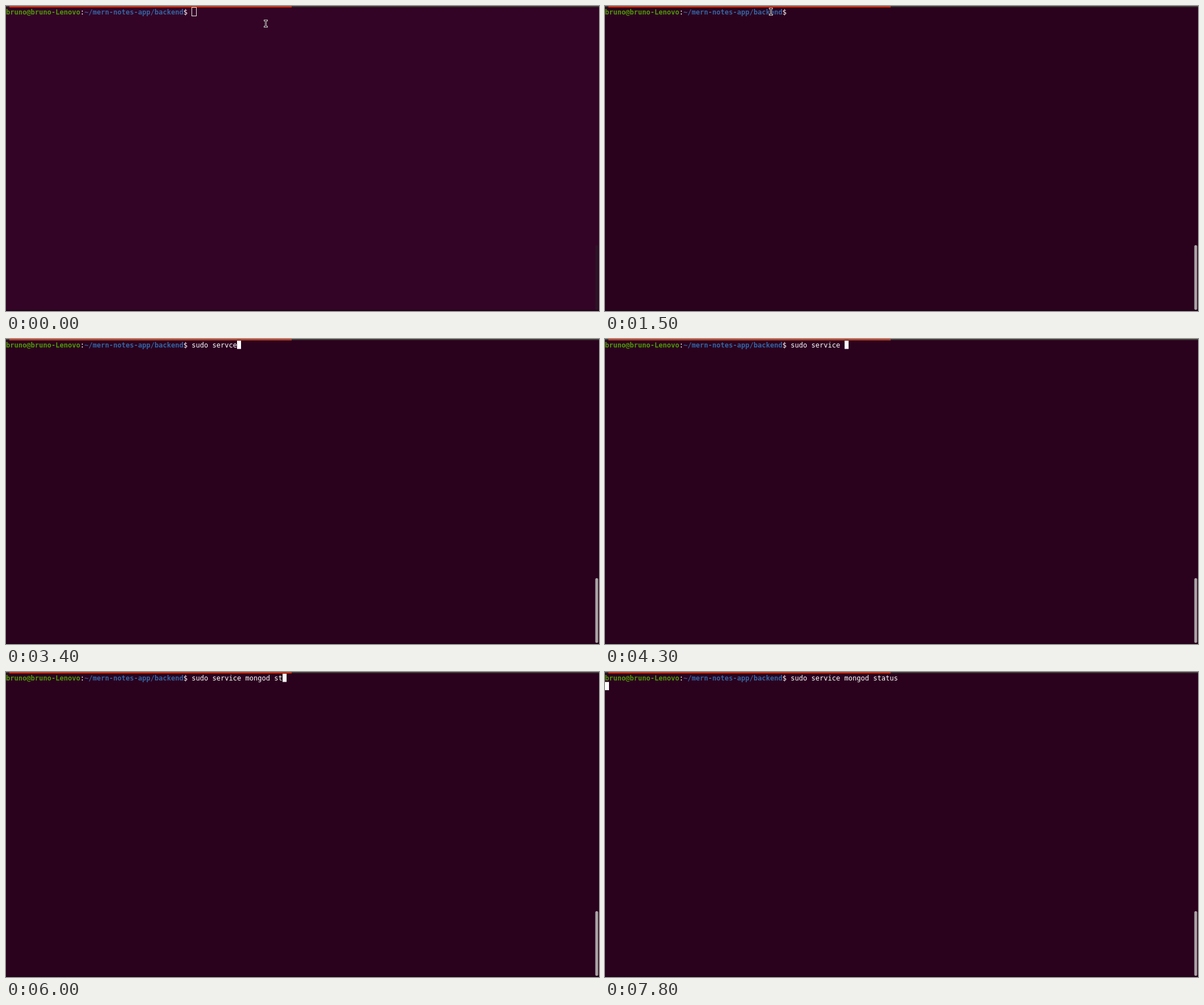
Recreate the animation shown at these times as an HTML page with a canvas. Size 1042x537 px, loop 8000 ms.

```html
<!DOCTYPE html>
<html lang="en">
<head>
<meta charset="utf-8">
<title>Terminal</title>
<style>
  html, body { margin: 0; width: 100%; height: 100%; overflow: hidden; background: #2b021e; }
  canvas { display: block; }
</style>
</head>
<body>
<canvas id="stage" width="1042" height="537"></canvas>
<script>
const ctx = document.getElementById('stage').getContext('2d');
const LOOP = 8000, CELL = 7.25, ROW = 14.5, TOP = 3, BASELINE = 15;
const FONT = '12.04px "DejaVu Sans Mono", monospace';

const PROMPT = [
  ['bruno@bruno-Lenovo', '#4e9a06', true],
  [':', '#ffffff'],
  ['~/mern-notes-app/backend', '#3465a4', true],
  ['$ ', '#ffffff']
];
const PROMPT_COLS = PROMPT.reduce((n, [text]) => n + text.length, 0);

// Each list holds [start time, value] and changes in hard steps.
const TYPED = [
  [0, ''], [2200, 's'], [2300, 'su'], [2400, 'sud'], [2500, 'sudo'], [2600, 'sudo '],
  [2800, 'sudo s'], [2900, 'sudo ser'], [3100, 'sudo serv'],
  [3300, 'sudo servc'], [3400, 'sudo servce'], [3700, 'sudo servc'], [3800, 'sudo serv'],
  [4200, 'sudo servic'], [4300, 'sudo service '],
  [4700, 'sudo service m'], [4800, 'sudo service mo'], [4900, 'sudo service mon'],
  [5000, 'sudo service mongo'], [5700, 'sudo service mongod'], [5800, 'sudo service mongod s'],
  [6000, 'sudo service mongod st'], [6100, 'sudo service mongod sta'],
  [6400, 'sudo service mongod st'], [6700, 'sudo service mongod s'],
  [7100, 'sudo service mongod st'], [7300, 'sudo service mongod sta'],
  [7400, 'sudo service mongod stat'], [7600, 'sudo service mongod status']
];
const POINTER = [
  [0, [456, 31]], [100, [466, 28]], [200, [475, 26]], [800, [377, 38]],
  [900, [334, 25]], [1000, [298, 13]], [1100, [277, 7]], [1200, [281, 9]],
  [1300, [287, 11]], [1500, [291, 10]], [1600, [296, 9]], [1800, [306, 9]], [2200, null]
];
const BACKGROUND = [[0, '#330426'], [400, '#2f0322'], [500, '#2b021e']];
const THUMB = [[0, '#2d1226'], [400, '#6c5966'], [500, '#aaa5a6']];
const CURSOR = [[0, 'outline'], [500, 'block'], [1100, 'off'], [1600, 'block']];

const at = (steps, t) => steps.findLast(([start]) => start <= t)[1];

function rect(color, x, y, w, h) {
  ctx.fillStyle = color;
  ctx.fillRect(x, y, w, h);
}

function write(text, col, color, bold) {
  ctx.font = (bold ? 'bold ' : '') + FONT;
  ctx.fillStyle = color;
  [...text].forEach((ch, i) => ctx.fillText(ch, (col + i) * CELL, BASELINE));
}

function drawCursor(mode, col, row) {
  const x = Math.round(col * CELL), w = Math.round((col + 1) * CELL) - x;
  const y = TOP + row * ROW;
  if (mode === 'block') rect('#ffffff', x, y, w, ROW);
  if (mode === 'outline') {
    ctx.strokeStyle = '#eeeeec';
    ctx.lineWidth = 1;
    ctx.strokeRect(x + .5, y - .5, w, ROW + .5);
  }
}

function drawPointer([x, y]) {
  const bars = grow => {
    for (const dy of [-6, 5]) ctx.fillRect(x - 2 - grow, y + dy - grow, 5 + 2 * grow, 1 + 2 * grow);
    ctx.fillRect(x - grow, y - 6, 1 + 2 * grow, 12);
  };
  ctx.fillStyle = '#c4bfc2';
  bars(1);
  ctx.fillStyle = '#201019';
  bars(0);
}

function draw(t) {
  rect(at(BACKGROUND, t), 0, 0, 1042, 537);
  rect('#22031a', 0, 535, 1042, 2);
  rect('#403c37', 0, 0, 1042, 2);
  rect('#cc3a1a', 6, 0, 496, 2.5);

  ctx.fillStyle = at(THUMB, t);
  ctx.beginPath();
  ctx.roundRect(1035.5, 421, 5, 114, 2.5);
  ctx.fill();

  let col = 0;
  for (const [text, color, bold] of PROMPT) {
    write(text, col, color, bold);
    col += text.length;
  }
  const typed = at(TYPED, t);
  write(typed, PROMPT_COLS, '#ffffff');

  const entered = t >= 7800;
  drawCursor(at(CURSOR, t), entered ? 0 : PROMPT_COLS + typed.length, entered ? 1 : 0);

  const pointer = at(POINTER, t);
  if (pointer) drawPointer(pointer);
}

function tick() {
  draw(performance.now() % LOOP);
  requestAnimationFrame(tick);
}
tick();
</script>
</body>
</html>
```
